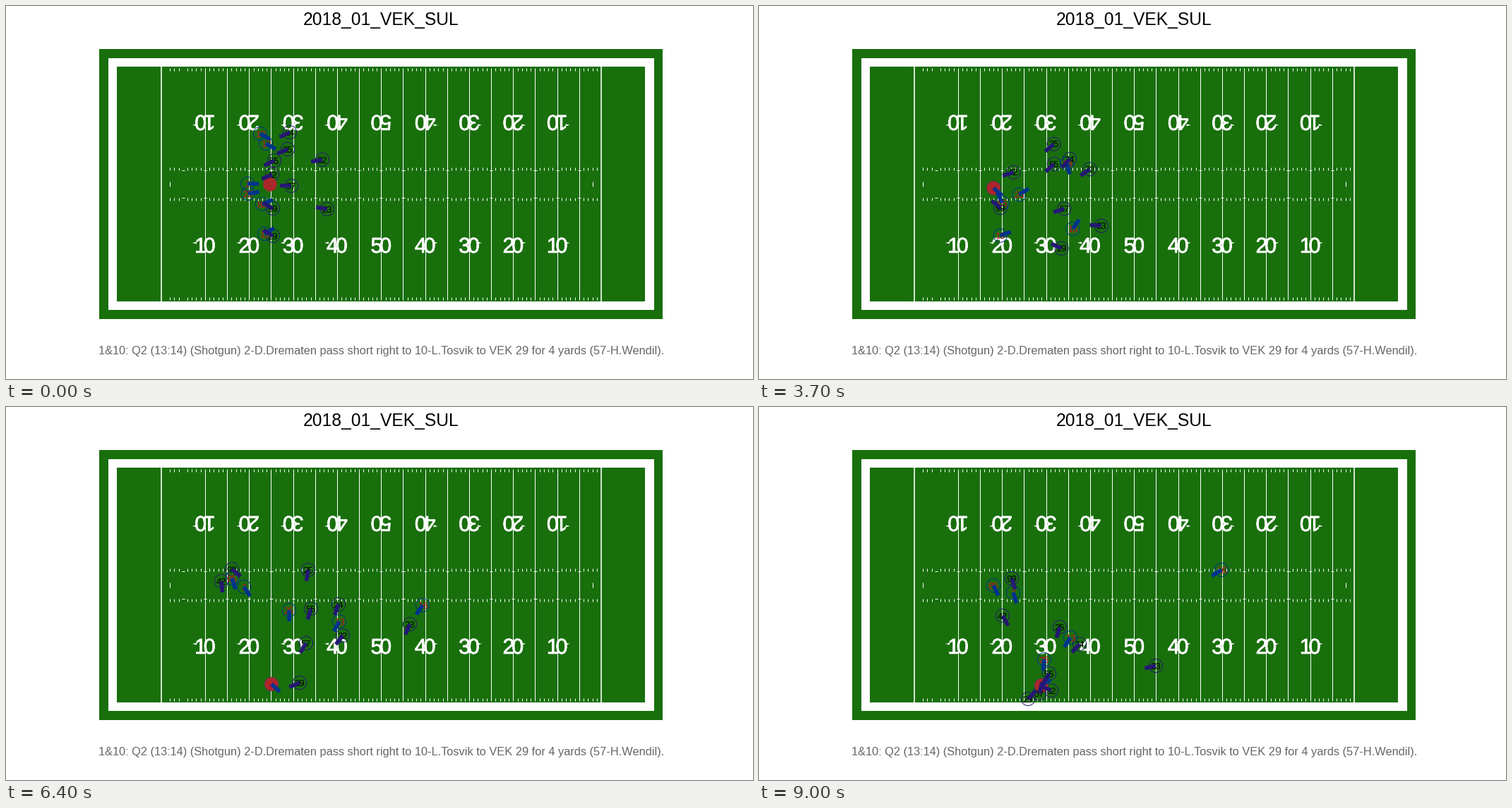
A matplotlib script for the animation above (9100 ms loop, 1058 px wide and 529 px high).

```python
import numpy as np
import matplotlib.pyplot as plt
from matplotlib import patheffects
from matplotlib.animation import FuncAnimation
from matplotlib.collections import LineCollection
from matplotlib.patches import Circle, Polygon, Rectangle

W, H, DPI = 1058, 529, 100
PT = 72 / DPI
FRAMES, STEP_MS = 91, 100

GRASS, BROWN = "#196f0c", "#aa282c"
NAVY, RED, PURPLE, BLACK = "#00338d", "#c60c30", "#241773", "#000000"

# Centre of the field and one yard, in pixels
MID_X, MID_Y, YARD = 531.3, 252.4, 6.234
SIDELINE, HASH, TICK = 160 / 6, 18.5 / 6, 2 / 3

# Moments of the play, in seconds
SNAP, IN_HAND, THROW, CATCH, WHISTLE = 1.2, 1.8, 4.7, 5.8, 9.0

plt.rcParams["font.family"] = "Liberation Sans"
fig = plt.figure(figsize=(W / DPI, H / DPI), dpi=DPI, facecolor="white")
ax = fig.add_axes([0, 0, 1, 1])
ax.set_xlim(0, W)
ax.set_ylim(H, 0)
ax.axis("off")


def text(x, y, s, size, color, z=2, **kw):
    return ax.text(x, y, s, fontsize=size * PT, color=color, ha="center",
                   va="baseline", zorder=z, **kw)


def yard_x(yd):
    return MID_X + yd * YARD


def yard_y(yd):
    return MID_Y + yd * YARD


def field_box(margin, color):
    half_w, half_h = (60 + margin) * YARD, (SIDELINE + margin) * YARD
    ax.add_patch(Rectangle((MID_X - half_w, MID_Y - half_h), 2 * half_w, 2 * half_h,
                           fc=color, lw=0, zorder=0))


def strokes(segments, width):
    ax.add_collection(LineCollection(segments, colors="white",
                                     linewidths=width * PT, capstyle="butt", zorder=1))


def vline(yd, y0, y1):
    return [(yard_x(yd), yard_y(y0)), (yard_x(yd), yard_y(y1))]


def draw_field():
    for margin, color in ((4, GRASS), (2, "white"), (0, GRASS)):
        field_box(margin, color)

    strokes([vline(yd, -SIDELINE, SIDELINE) for yd in (-50, 50)], 1.6)
    inset = SIDELINE - 0.3
    strokes([vline(yd, -inset, inset) for yd in range(-40, 50, 5)], 1)

    marks = [vline(yd, -0.5, 0.5) for yd in (-48, 48)]
    for yd in range(-48, 50):
        for side in (-1, 1):
            if yd % 5:
                marks.append(vline(yd, side * HASH, side * (HASH + TICK)))
                marks.append(vline(yd, side * inset, side * (inset - TICK)))
            else:
                y = yard_y(side * HASH)
                marks.append([(yard_x(yd - TICK / 2), y), (yard_x(yd + TICK / 2), y)])
    strokes(marks, 1)

    for yd in range(-40, 50, 10):
        for side in (-1, 1):
            draw_number(yd, side)


def draw_number(yd, side):
    """Yard number facing its sideline, with an arrow to the nearer goal."""
    x, bold = yard_x(yd), [patheffects.withStroke(linewidth=0.5, foreground="white")]
    tens = str((50 - abs(yd)) // 10)
    for digit, dx in ((tens, -6.4), ("0", 6.4)):
        text(x + side * dx, MID_Y + side * 97.5, digit, 30.5, "white",
             rotation=90 - 90 * side, rotation_mode="anchor", path_effects=bold)
    if yd:
        out, y = np.sign(yd), MID_Y + side * 83.5
        ax.add_patch(Polygon([(x + out * 12, y - 1.5), (x + out * 12, y + 1.5),
                              (x + out * 18, y)], fc="white", lw=0, zorder=1))


def unit(v, soft):
    """Direction of v, fading out when v is short compared with soft."""
    return v / (np.hypot(*v) + soft)


class Player:
    """Runs a smooth route: lined up, at the throw, after the catch, at the end."""
    BAR = 16

    def __init__(self, number, route, front, color, ink, go=SNAP):
        self.times = np.array([go, 4.5, 6.4, WHISTLE])
        self.route = np.array(route, float)
        self.slope = np.gradient(self.route, self.times, axis=0)
        self.slope[[0, -1]] = 0
        self.front = np.array([front, 0])
        self.ring = ax.add_patch(Circle((0, 0), 9.6, fill=False, ec=color,
                                        lw=0.95 * PT, zorder=3))
        self.label = text(0, 0, number, 13, ink, z=5)
        self.bar, = ax.plot([], [], color=color, lw=5.6 * PT,
                            solid_capstyle="butt", zorder=6)

    def pos(self, t):
        t = np.clip(t, self.times[0], WHISTLE)
        i = min(np.searchsorted(self.times, t, side="right"), 3) - 1
        h = self.times[i + 1] - self.times[i]
        u = (t - self.times[i]) / h
        (p, q), (m, n) = self.route[i:i + 2], self.slope[i:i + 2] * h
        return (p + u * m + u * u * (3 * (q - p) - 2 * m - n)
                + u ** 3 * (2 * (p - q) + m + n))

    def gaze(self, t):
        """Square to the line at first, later between the ball and the run."""
        run = (self.pos(t + 0.05) - self.pos(t - 0.05)) / 0.1
        square = 1.5 * np.clip((THROW - t) / (THROW - SNAP), 0, 1)
        look = unit(ball_pos(t) - self.pos(t), 5) + unit(run, 10) + square * self.front
        return look / (np.hypot(*look) + 1e-9)

    def update(self, t):
        here = self.pos(t)
        tip = here + self.BAR * self.gaze(t)
        self.ring.center = here
        self.label.set_position(here + (0, 4.6))
        self.bar.set_data(*zip(here, tip))


def offence(number, *route, **kw):
    return Player(number, route, 1, NAVY, RED, **kw)


def defence(number, *route):
    return Player(number, route, -1, PURPLE, BLACK)


draw_field()
text(531, 26.5, "2018_01_VEK_SUL", 24.6, "black")
text(531.5, 494, "1&10: Q2 (13:14) (Shotgun) 2-D.Drematen pass short right to "
     "10-L.Tosvik to VEK 29 for 4 yards (57-H.Wendil).", 16.34, "#666666")

passer = offence("2", (342, 252), (331, 259), (337, 255), (360, 263))
catcher = offence("10", (360, 181), (346, 354), (376, 393), (400, 395), go=0)
players = [
    passer, catcher,
    offence("13", (368, 195), (456, 242), (472, 304), (441, 327)),
    offence("25", (343, 266), (379, 271), (401, 288), (404, 358)),
    offence("85", (363, 281), (337, 273), (320, 243), (332, 253)),
    offence("16", (366, 323), (484, 309), (590, 281), (655, 231)),
    defence("24", (402, 179), (453, 235), (471, 280), (454, 336)),
    defence("25", (399, 203), (423, 200), (428, 231), (426, 312)),
    defence("32", (448, 218), (474, 249), (477, 324), (414, 402)),
    defence("55", (380, 219), (428, 235), (432, 286), (411, 378)),
    defence("42", (377, 239), (348, 237), (305, 247), (345, 296)),
    defence("57", (404, 255), (437, 302), (425, 335), (397, 406)),
    defence("99", (378, 287), (331, 277), (320, 230), (358, 243)),
    defence("23", (455, 288), (505, 316), (572, 308), (562, 367)),
    defence("29", (378, 326), (437, 355), (416, 391), (381, 414)),
]
SPOT = np.array([374, 253])
ball = ax.add_patch(Circle((0, 0), 9.8, fc=BROWN, lw=0, zorder=4))


def ball_pos(t):
    """On the spot, snapped to the passer, thrown, then carried."""
    snap = np.clip((t - SNAP) / (IN_HAND - SNAP), 0, 1)
    flight = np.clip((t - THROW) / (CATCH - THROW), 0, 1)
    held = SPOT + snap * (passer.pos(min(t, THROW)) - SPOT)
    return held + flight * (catcher.pos(max(t, CATCH)) - held)


def draw(frame):
    t = frame * STEP_MS / 1000
    for player in players:
        player.update(t)
    ball.center = ball_pos(t)
    return []


anim = FuncAnimation(fig, draw, frames=FRAMES, interval=STEP_MS,
                     repeat=True, repeat_delay=0, blit=False)
plt.show()
```
